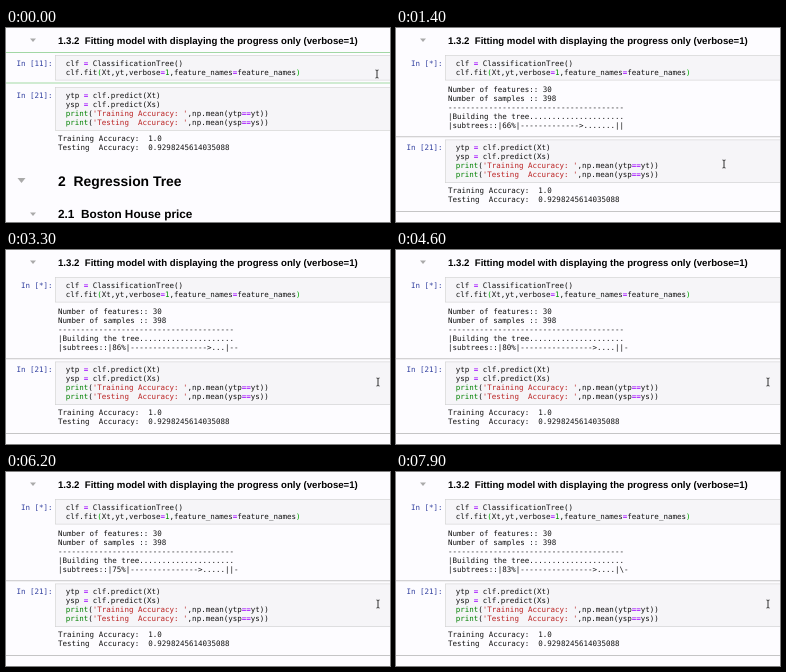
These frames come from a looping animation (384 by 194 pixels, 8 s). An HTML page:

```html
<!DOCTYPE html>
<html lang="en">
<head>
<meta charset="utf-8">
<title>Fitting a tree in a notebook</title>
<style>
  html, body { margin: 0; width: 100%; height: 100%; overflow: hidden; background: #fdfcff; }
  svg { display: block; width: 384px; height: 194px; }
  text { white-space: pre; text-rendering: geometricPrecision; }
  .mono { font: 7.5px "DejaVu Sans Mono", monospace; fill: #111; }
  .head { font-family: "Liberation Sans", Arial, sans-serif; font-weight: bold; }
  .mono.prompt { fill: #303f9f; text-anchor: end; }
  .box { fill: #f6f5f8; stroke: #cfcfcf; stroke-width: .6; }
  .cell { fill: none; stroke-width: .8; }
  .toggle { fill: #aaa; }
  .op { fill: #aa22ff; font-weight: bold; }
  .fn { fill: #008000; }
  .str { fill: #ba2121; }
  .num { fill: #008800; }
  .match { fill: #00a800; }
</style>
</head>
<body>
<svg viewBox="0 0 384 194">
  <path class="toggle" d="M24 10.5h6l-3 3.5z"/>
  <text class="head" x="52" y="16" font-size="9.65">1.3.2  Fitting model with displaying the progress only (verbose=1)</text>

  <rect id="editing" class="cell" x="-9" y="24.4" width="402" height="30.6" stroke="#8ccf8f"/>
  <rect class="box" x="49.5" y="27.5" width="345" height="24.6"/>
  <text id="prompt" class="mono prompt" x="46.5" y="37.6"></text>
  <g id="fit"></g>
  <g id="output"></g>

  <g id="lower">
    <rect id="selected" class="cell" x="-9" y="56.5" width="402" height="74.7" stroke="#b8b8b8"/>
    <rect class="box" x="49.5" y="59.6" width="345" height="42.8"/>
    <text class="mono prompt" x="46.5" y="69.7">In [21]:</text>
    <g id="predict"></g>
    <g id="scores"></g>
    <path class="toggle" d="M11.5 150h8l-4 5z"/>
    <text class="head" x="52" y="157.5" font-size="13.9">2  Regression Tree</text>
    <path class="toggle" d="M24 184.5h6l-3 3.5z"/>
    <text class="head" x="52" y="190" font-size="11.8">2.1  Boston House price</text>
  </g>

  <path id="cursor" d="M-1.5-4Q0-4 0-3Q0-4 1.5-4M0-3V3M-1.5 4Q0 4 0 3Q0 4 1.5 4" fill="none" stroke="#333" stroke-width="1"/>
</svg>
<script>
const $ = id => document.getElementById(id);
const LOOP = 8000, RUN = 400, LINE = 9.1, SHIFT = 52.3;

const tint = (kind, s) => `<tspan class="${kind}">${s}</tspan>`;
const eq = tint('op', '=');
const print = (label, a, b) => tint('fn', 'print') + '(' + tint('str', `'${label}: '`) +
  `,np.mean(${a}${tint('op', '==')}${b}))`;

function write(id, x, y, lines) {
  $(id).innerHTML = lines.map((s, i) =>
    `<text class="mono" x="${x}" y="${y + i * LINE}">${s}</text>`).join('');
}

write('fit', 59.7, 37.6, [
  `clf ${eq} ClassificationTree()`,
  `clf.fit${tint('match', '(')}Xt,yt,verbose${eq}${tint('num', 1)},feature_names${eq}feature_names${tint('match', ')')}`
]);
write('predict', 59.7, 69.7, [
  `ytp ${eq} clf.predict(Xt)`,
  `ysp ${eq} clf.predict(Xs)`,
  print('Training Accuracy', 'ytp', 'yt'),
  print('Testing  Accuracy', 'ysp', 'ys')
]);
write('scores', 52, 113, ['Training Accuracy:  1.0', 'Testing  Accuracy:  0.9298245614035088']);
write('output', 52, 63.6, [
  'Number of features:: 30',
  'Number of samples :: 398',
  '-'.repeat(39),
  '|Building the tree' + '.'.repeat(21),
  ''
]);
const bar = $('output').lastChild;

// start time, percent, spinner
const steps = [
  [400, 0, '|'], [600, 33, '/'], [900, 50, '-'], [1200, 66, '|'],
  [1600, 75, '/'], [2000, 80, '-'], [2400, 83, '\\'], [2800, 85, '|'],
  [3200, 86, '-'], [3600, 87, '\\'], [4000, 75, '/'], [4400, 80, '|'],
  [4800, 83, '/'], [5200, 46, '-'], [5600, 66, '\\'], [6000, 75, '|'],
  [6400, 80, '/'], [6800, 83, '\\'], [7100, 85, '|'], [7500, 80, '/'], [7800, 83, '\\']
];

// time, x, y of the pointer
const path = [[0, 371, 46], [300, 371, 46], [900, 328, 136], [1900, 328, 136], [2500, 372, 132], [LOOP, 372, 132]];

function pointer(t) {
  const i = path.findIndex(p => p[0] > t);
  const [t0, x0, y0] = path[i - 1], [t1, x1, y1] = path[i];
  const u = (t - t0) / (t1 - t0), k = u * u * (3 - 2 * u);
  return `translate(${x0 + (x1 - x0) * k} ${y0 + (y1 - y0) * k})`;
}

function progress(t) {
  const [, percent, spin] = steps.filter(s => s[0] <= t).pop();
  const n = Math.floor(percent / 5);
  const label = String(percent).padStart(2);
  return `|subtrees::|${label}%|${'-'.repeat(n)}>${'.'.repeat(20 - n)}|${spin}${t < 2000 ? '' : '-'}`;
}

function render(t) {
  const running = t >= RUN;
  const show = (id, on) => $(id).setAttribute('visibility', on ? 'visible' : 'hidden');
  show('editing', !running);
  show('selected', running);
  show('output', running);
  $('prompt').textContent = running ? 'In [*]:' : 'In [11]:';
  $('lower').setAttribute('transform', `translate(0 ${running ? SHIFT : 0})`);
  if (running) bar.textContent = progress(t);
  $('cursor').setAttribute('transform', pointer(t));
}

const start = performance.now();
function tick() {
  render((performance.now() - start) % LOOP);
  requestAnimationFrame(tick);
}
tick();
</script>
</body>
</html>
```
